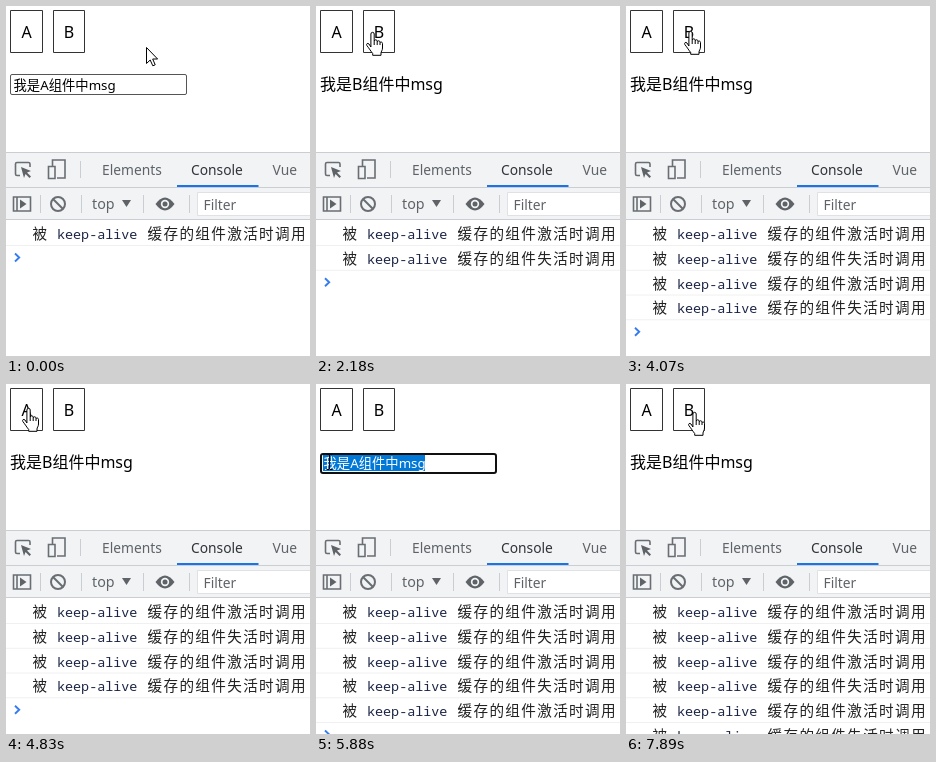
An HTML page for the animation above (8 s loop, 304x350 px).

```html
<!DOCTYPE html>
<html lang="zh-CN">
<head>
<meta charset="utf-8">
<style>
  html, body { margin: 0; width: 100%; height: 100%; overflow: hidden; background: #fff; }
  svg { display: block; font: 13.8px "Noto Sans", "Noto Sans CJK SC", sans-serif; }
  .page { font-size: 16px; }
  .field { font-size: 13.33px; }
  .tool { fill: #5f6368; }
  .icon { fill: none; stroke: #6a6e73; stroke-width: 1.6; }
  .rule { stroke: #cacdd1; }
  .cjk { font: 14.6px "Noto Sans CJK SC", sans-serif; letter-spacing: 1.35px; fill: #222; }
  .code { font: 13.4px "Noto Sans Mono", monospace; fill: #1c2545; }
  .cursor { fill: #fff; stroke: #000; stroke-linejoin: round; }
</style>
</head>
<body>
<svg width="304" height="350" viewBox="0 0 304 350">
  <g class="page">
    <path d="M4.5 4.5h32v42h-32zM47.5 4.5h31v42h-31z" fill="none" stroke="#333"/>
    <text x="20.5" y="32" text-anchor="middle">A</text>
    <text x="63" y="32" text-anchor="middle">B</text>
    <text id="viewB" x="4" y="84">我是B组件中msg</text>
  </g>

  <g id="viewA" class="field">
    <rect id="box" fill="#fff"/>
    <text id="value" x="7.5" y="84"></text>
    <clipPath id="clip"><rect id="sel" y="71" height="16"/></clipPath>
    <g clip-path="url(#clip)">
      <rect x="4" y="68" width="177" height="21" fill="#0078d7"/>
      <text x="7.5" y="84" fill="#fff">我是A组件中msg</text>
    </g>
    <path id="caret" d="M15.5 72v15" stroke="#000"/>
  </g>

  <path d="M0 146h304v68H0z" fill="#f1f3f4"/>
  <path class="rule" d="M0 146.5h304M0 181.5h304M0 213.5h304M74.5 155v17M34.5 189v18M75.5 189v18M137.5 189v18M183.5 189v18"/>
  <path d="M171 179h81.500v2h-81.500z" fill="#1a73e8"/>
  <path d="M191.5 186.5h120v23h-120z" fill="#fff" stroke="#dfe1e4"/>
  <g class="tool">
    <text x="96" y="169">Elements</text>
    <text x="185" y="169" fill="#303439">Console</text>
    <text x="266.5" y="169">Vue</text>
    <text x="86" y="203" font-size="14.3">top</text>
    <text x="197.5" y="204">Filter</text>
    <path d="M116 194h9l-4.500 7z"/>
    <path d="M15 161l10 4-4 1.500 4 4-1.500 1.500-4-4-1.500 4z"/>
    <path d="M14 193.500l6.500 4.500-6.500 4.500z"/>
    <path d="M149.500 198q9.500-13 19 0q-9.500 13-19 0z"/>
    <circle cx="159" cy="198" r="4.200" fill="#f1f3f4"/>
    <circle cx="159" cy="198" r="2.500"/>
  </g>
  <g class="icon">
    <path d="M14 169.500h-3q-1.500 0-1.500-1.500v-10q0-1.500 1.500-1.500h11.500q1.500 0 1.500 1.500v3"/>
    <path d="M46.500 160v-6h12.500v18h-8M42.500 160.500h6.500v12h-6.500z"/>
    <path d="M7.500 191h17v14h-17zM11 191v14"/>
    <g stroke-width="2">
      <circle cx="52" cy="198" r="7"/>
      <path d="M47 193l10 10"/>
    </g>
  </g>

  <g id="log"></g>
  <path id="prompt" d="M9 247.500l4.200 4-4.200 4" fill="none" stroke="#367cf1" stroke-width="1.900"/>

  <g id="arrow" class="cursor"><path d="M.5.5v16l3.700-3.500 2.600 5.800 2.400-1-2.500-5.800h4.900z"/></g>
  <g id="hand" class="cursor">
    <path d="M4.900 15V2a1.600 1.600 0 0 1 3.300 0V9c.4-1.600 2.800-1.600 3 0v.8c.4-1.400 2.600-1.400 2.800.1v.9c.5-1.200 2.400-1 2.500.6V16c0 2.500-1.500 3.500-1.500 5v2.300H6.700V21.500C5 19.500 3.200 16.500.9 13.600-.2 12 1.600 10.600 3 12z"/>
    <path d="M8.200 9v4M11.200 10v3M14 11v2" fill="none"/>
  </g>
  <g id="beam" class="cursor"><path d="M.5.5H3l.5.5.5-.5h2.500M3.500 1v14M.5 15.500H3l.5-.5.5.5h2.500" fill="none"/></g>
</svg>
<script>
const LOOP = 8000, ROW = 24.75, TEXT_END = 109;
const $ = id => document.getElementById(id);
const show = (id, on) => $(id).style.display = on ? "" : "none";
const set = (id, attrs) => { for (const k in attrs) $(id).setAttribute(k, attrs[k]); };

// Pointer samples: start time, shape, left, top
const pointer = [
  [0, "arrow", 140, 41], [650, "arrow", 132, 50], [770, "arrow", 110, 55],
  [890, "arrow", 86, 51], [1010, "hand", 60, 38], [1130, "hand", 42, 29],
  [1280, "hand", 30, 30], [1400, "hand", 24, 28], [1520, "hand", 23, 27],
  [1640, "hand", 41, 27], [1760, "hand", 54, 27],
  [2180, "hand", 50, 26], [2300, "hand", 41, 25], [2420, "hand", 29, 24],
  [2540, "hand", 22, 24], [2690, "hand", 21, 24],
  [3520, "hand", 43, 25], [3640, "hand", 58, 25],
  [4470, "hand", 52, 25], [4590, "hand", 36, 26], [4710, "hand", 22, 25],
  [4830, "hand", 16, 24], [5100, "beam", 118, 68], [5250, "beam", 134, 69],
  [5370, "beam", 98, 70], [5490, "beam", 28, 70], [5640, "beam", 19, 70],
  [5760, "beam", 12, 70], [5880, "beam", 10, 70], [6030, "beam", 24, 71],
  [6150, "beam", 54, 73], [6280, "arrow", 87, 90], [6400, "arrow", 98, 96],
  [7120, "beam", 80, 70], [7260, "arrow", 76, 64], [7380, "arrow", 72, 50],
  [7500, "hand", 65, 33], [7630, "hand", 62, 28]
];
// Each click swaps A and B and appends one console line
const clicks = [2060, 2970, 4070, 4980, 7770];

$("log").innerHTML = clicks.concat(0).map((_, i) => `
  <g transform="translate(0 ${i * ROW})">
    <path d="M0 239.500h304" stroke="#f0f0f0"/>
    <text class="cjk" x="26.500" y="233">被</text>
    <text class="code" x="51" y="233">keep-alive</text>
    <text class="cjk" x="141.500" y="233">缓存的组件${i % 2 ? "失" : "激"}活时调用</text>
  </g>`).join("");
const rows = [...$("log").children];

function draw(t) {
  const lines = 1 + clicks.filter(c => c <= t).length;
  rows.forEach((row, i) => row.style.display = i < lines ? "" : "none");
  set("prompt", { transform: `translate(0 ${(lines - 1) * ROW})` });
  show("viewA", lines % 2);
  show("viewB", lines % 2 === 0);

  const [, shape, x, y] = pointer.findLast(p => p[0] <= t);
  for (const id of ["arrow", "hand", "beam"]) show(id, id === shape);
  set(shape, { transform: `translate(${x} ${y})` });

  const focused = t >= 5370, typed = t >= 6830;
  set("box", focused
    ? { x: 5, y: 70, width: 175, height: 19, rx: 2, stroke: "#101010", "stroke-width": 2 }
    : { x: 4.5, y: 68.5, width: 176, height: 20, rx: 1.5, stroke: "#555", "stroke-width": 1 });
  $("value").textContent = typed ? "1" : "我是A组件中msg";
  show("caret", typed && t < 7380);

  const from = t >= 5880 ? 7 : x + 3.5;
  set("sel", { x: from, width: focused && !typed ? Math.max(0, TEXT_END - from) : 0 });
}

const start = performance.now();
(function tick() {
  draw((performance.now() - start) % LOOP);
  requestAnimationFrame(tick);
})();
</script>
</body>
</html>
```
